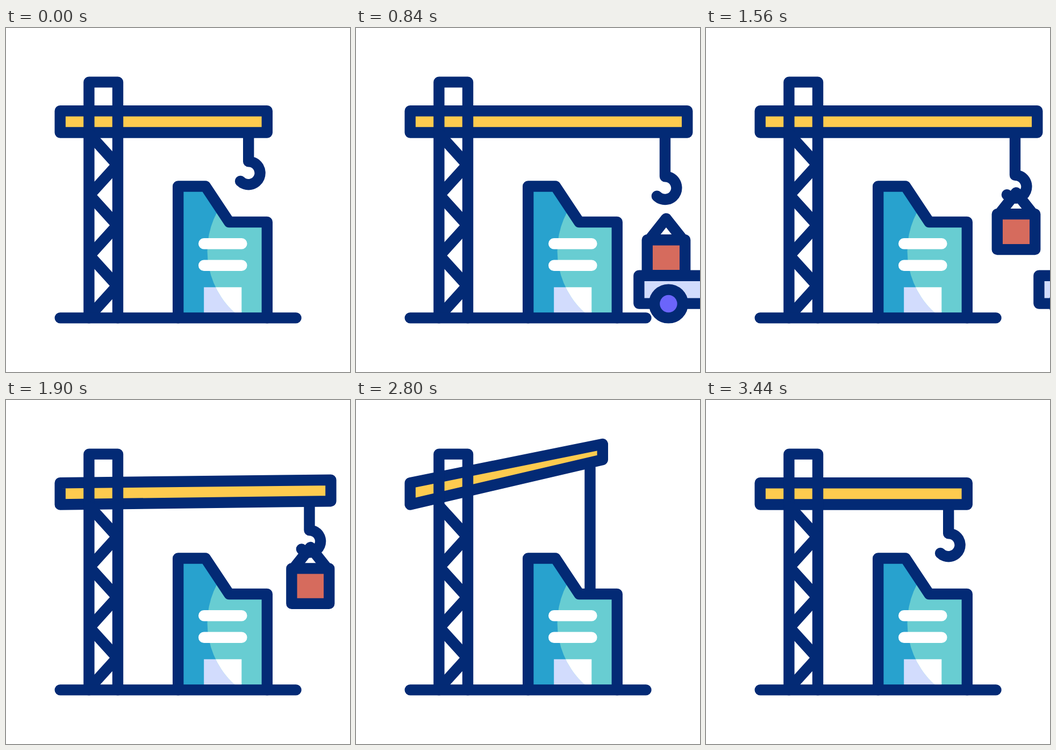
Write an HTML page that moves like this. It is 640 by 640 pixels and loops after 3.6 s.

```html
<!DOCTYPE html>
<html lang="en">
<head>
<meta charset="utf-8">
<title>Crane at work</title>
<style>
  html, body { margin: 0; height: 100%; overflow: hidden; background: #fff; }
  svg { display: block; width: 640px; height: 640px; }
  .line {
    fill: none;
    stroke: #032a75;
    stroke-width: 20.4;
    stroke-linecap: round;
    stroke-linejoin: round;
  }
  .load * { vector-effect: non-scaling-stroke; }
</style>
</head>
<body>
<svg viewBox="0 0 640 640">
  <defs>
    <clipPath id="lit"><circle cx="529.6" cy="415" r="155"/></clipPath>
    <path id="house" d="M320.2 539.3V294.5H371L415.2 361H485.8V539.3"/>
    <rect id="door" x="368.2" y="482.3" width="70.1" height="57"/>
  </defs>

  <path class="line" id="hook"/>

  <g class="load" id="load">
    <path class="line" d="M-31.5 0L0 -39.7L31.5 0"/>
    <rect class="line" style="fill:#d66b5d" x="-35.2" width="70.4" height="66"/>
  </g>

  <g id="truck">
    <rect class="line" style="fill:#d2dcfd" x="526.4" y="460.8" width="280" height="51.8"/>
    <circle class="line" style="fill:#6b65fb" cx="581.4" cy="513" r="26.4"/>
  </g>

  <path class="line" style="fill:#fecb4f" id="boom"/>
  <path class="line" d="M154.4 539.3V100.6H208V539.3"/>
  <path class="line" id="lattice"/>

  <use href="#house" fill="#28a2ce"/>
  <use href="#door" fill="#d2dcfd"/>
  <g clip-path="url(#lit)">
    <use href="#house" fill="#68cdd2"/>
    <use href="#door" fill="#fff"/>
  </g>
  <path class="line" style="stroke:#fff" d="M368.2 401.3h70.2m-70.2 40.4h70.2"/>
  <use class="line" href="#house"/>

  <path class="line" d="M100.7 539.4H539.5"/>
</svg>

<script>
  const LOOP = 3600;
  const part = id => document.getElementById(id);
  const [hook, load, truck, boom, lattice] =
    ['hook', 'load', 'truck', 'boom', 'lattice'].map(part);

  // eased progress from 0 to 1 between two times
  function ease(t, from, to) {
    const p = Math.min(1, Math.max(0, (t - from) / (to - from)));
    return p * p * (3 - 2 * p);
  }

  function drawLattice() {
    const points = [];
    for (let i = 0; i < 7; i++) points.push([i % 2 ? 206.7 : 155.7, 198.2 + 56.27 * i]);
    lattice.setAttribute('d', 'M' + points.join('L'));
  }

  function draw(t) {
    const reach = ease(t, 0, 590);
    const grab = ease(t, 590, 1190);
    const lift = ease(t, 1195, 1800);
    const swing = ease(t, 1800, 2400);
    const drop = ease(t, 2400, 2920);
    const away = 1 - ease(t, 2920, 3440);
    const tilt = swing * away;

    const tip = 485.8 + (130.5 * reach - 157.5 * swing) * away;
    boom.setAttribute('d',
      `M100.7 154.2L${tip} ${154.2 - 72.2 * tilt}V${194.5 - 83.5 * tilt}L100.7 194.5Z`);

    const ropeX = 451.2 + (123.8 * reach - 139.5 * swing) * away;
    const ropeEnd = 248.4 + (73.5 * (grab - lift) - 81.4 * swing + 226 * drop) * away;
    const r = 21.4 - 10.4 * tilt;
    const k = r * Math.SQRT1_2;
    hook.setAttribute('d',
      `M${ropeX} ${194.5 - 68.5 * tilt}V${ropeEnd}a${r} ${r} 0 1 1 ${-k} ${r + k}`);

    const loadX = 577 + 142 * (1 - reach) - 141.6 * swing;
    const loadY = 394.3 - 73.5 * lift - 98 * swing + 226 * drop;
    load.setAttribute('transform', `translate(${loadX} ${loadY}) scale(${1 - 0.113 * swing})`);
    load.setAttribute('visibility', drop < 1 ? 'visible' : 'hidden');

    truck.setAttribute('transform', `translate(${142 * (1 - reach + lift)})`);
  }

  const start = performance.now();
  function tick() {
    draw((performance.now() - start) % LOOP);
    requestAnimationFrame(tick);
  }

  drawLattice();
  tick();
</script>
</body>
</html>
```
